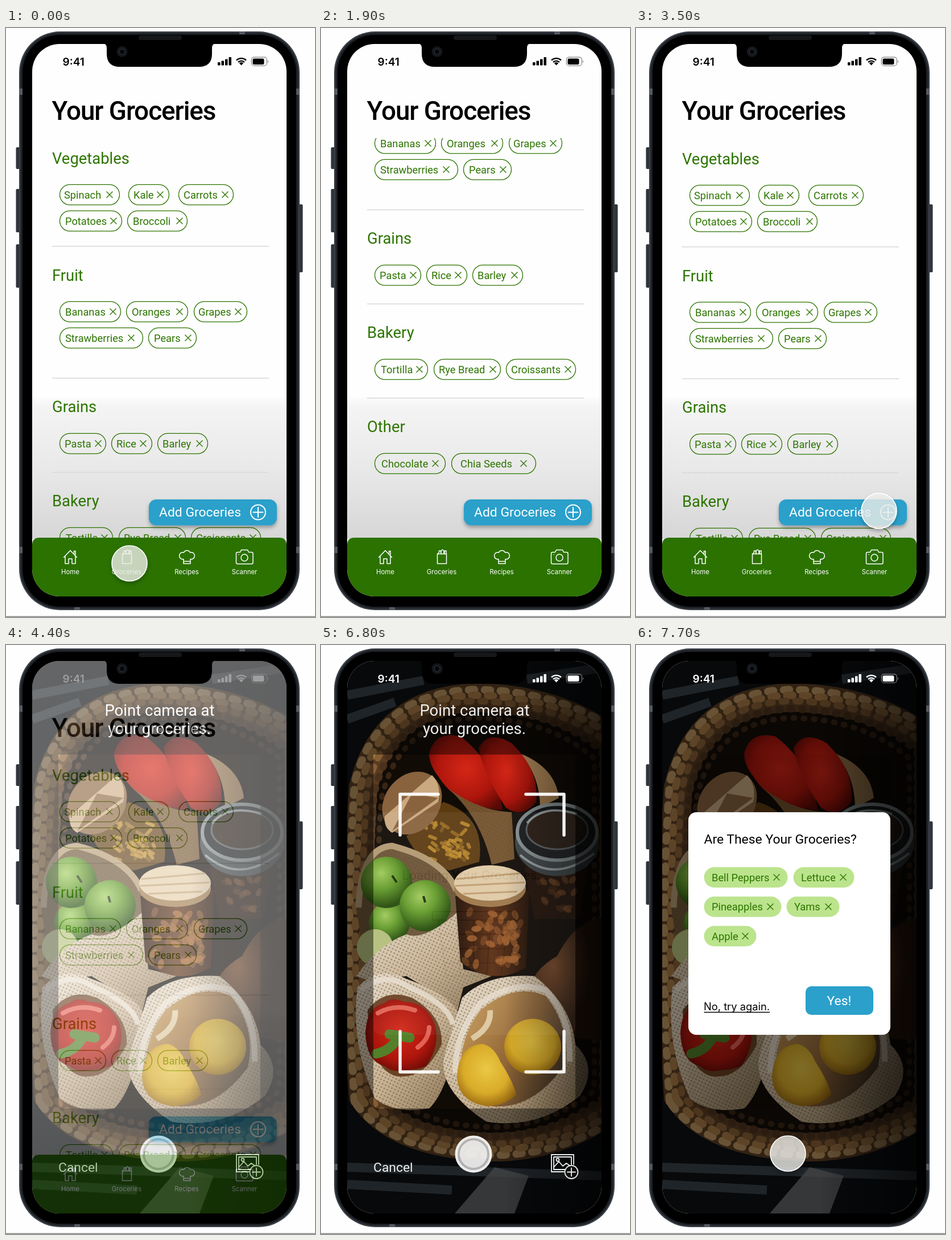
These frames come from a looping animation (543 px wide and 1032 px high, 8 s). An HTML page:

```html
<!DOCTYPE html>
<html lang="en">
<head>
<meta charset="utf-8">
<title>Groceries app</title>
<style>
html, body { margin: 0; width: 100%; height: 100%; overflow: hidden; background: #fefefe; }
svg { display: block; width: 100vw; height: 100vh; }
text { font-family: Roboto, sans-serif; font-size: 18.3px; }
.inter { font-family: Inter, sans-serif; }
.title { font-size: 45.8px; font-weight: 500; letter-spacing: -1.05px; }
.head { font-size: 27.4px; fill: #2d7500; }
.big { font-size: 27.5px; }
.mid { font-size: 22.9px; }
.nav { font-size: 11.4px; }
.time { font-size: 19px; font-weight: 600; }
.line { fill: none; stroke: currentColor; stroke-linecap: round; stroke-linejoin: round; }
.ring { transform-origin: 285px 488px; }

.list, .touch, .camera, .corners, .ui, .shade, .card, .loading, .confirm {
  animation: 8s linear infinite both;
}
.list { animation-name: scroll; }
.touch { animation-name: touch; }
.camera { animation-name: dissolve; }
.corners { animation-name: focus; }
.ui { animation-name: clear; }
.shade, .card { animation-name: show; }
.loading { animation-name: loading; }
.confirm { animation-name: confirm; }

@keyframes scroll {
  0%, 12.5% { transform: translateY(0); animation-timing-function: ease-in-out; }
  18% { transform: translateY(-298px); animation-timing-function: ease-out; }
  23.75% { transform: translateY(-295px); }
  27.5%, 30% { transform: translateY(-294px); animation-timing-function: ease-in-out; }
  33.2%, 33.75% { transform: translateY(4px); animation-timing-function: ease-out; }
  40%, 43.75% { transform: translateY(1px); }
  46.25%, 100% { transform: translateY(0); }
}
@keyframes touch {
  0%, 7.5% { transform: translate(217px, 938px); opacity: 1; }
  9.4% { transform: translate(217px, 938px); opacity: 0; }
  9.41% { transform: translate(250px, 739px); opacity: 0; }
  10%, 12.5% { transform: translate(250px, 739px); opacity: 1; animation-timing-function: ease-in-out; }
  18% { transform: translate(250px, 441px); opacity: .8; }
  20% { transform: translate(250px, 441px); opacity: 0; }
  25.5% { transform: translate(282px, 444px); opacity: 0; }
  27.5%, 30% { transform: translate(282px, 444px); opacity: 1; animation-timing-function: ease-in-out; }
  33.2% { transform: translate(282px, 742px); opacity: .7; }
  33.75% { transform: translate(282px, 742px); opacity: .38; }
  35% { transform: translate(282px, 742px); opacity: 0; }
  35.01%, 41.25% { transform: translate(427px, 846px); opacity: 0; }
  43%, 45.5% { transform: translate(427px, 846px); opacity: 1; }
  47.5%, 96.24% { transform: translate(427px, 846px); opacity: 0; }
  96.25%, 100% { transform: translate(267px, 891px); opacity: 1; }
}
@keyframes dissolve {
  0%, 51% { opacity: 0; animation-timing-function: ease-out; }
  60%, 100% { opacity: 1; }
}
@keyframes focus {
  0%, 74.8% { opacity: 0; }
  78%, 100% { opacity: 1; }
}
@keyframes clear {
  0%, 84.5% { opacity: 1; }
  92%, 100% { opacity: 0; }
}
@keyframes show {
  0%, 84.6% { opacity: 0; }
  92.5%, 100% { opacity: 1; }
}
@keyframes loading {
  0%, 96.24% { opacity: 1; }
  96.25%, 100% { opacity: 0; }
}
@keyframes confirm {
  0%, 96.24% { opacity: 0; }
  96.25%, 100% { opacity: 1; }
}
</style>
</head>
<body>
<svg viewBox="0 0 543 1032" preserveAspectRatio="none">
  <defs>
    <clipPath id="screen"><rect x="46" y="28" width="447" height="968" rx="48"/></clipPath>
    <clipPath id="view"><rect x="46" y="193" width="447" height="701"/></clipPath>
    <linearGradient id="fog" x1="0" y1="0" x2="0" y2="1">
      <stop offset="0" stop-color="#fefefe"/><stop offset=".07" stop-color="#f4f4f4"/>
      <stop offset=".5" stop-color="#e9e9e9"/><stop offset="1" stop-color="#d6d6d6"/>
    </linearGradient>
    <linearGradient id="dusk">
      <stop offset=".62" stop-color="#000" stop-opacity="0"/><stop offset="1" stop-color="#000" stop-opacity=".6"/>
    </linearGradient>
    <linearGradient id="cloth" x1="0" y1="0" x2="1" y2="1">
      <stop stop-color="#efe4d2"/><stop offset=".55" stop-color="#cdb797"/><stop offset="1" stop-color="#8a7453"/>
    </linearGradient>
    <linearGradient id="inside" x1="0" y1="0" x2="1" y2=".6">
      <stop stop-color="#d3a55c"/><stop offset=".6" stop-color="#94683a"/><stop offset="1" stop-color="#54402b"/>
    </linearGradient>
    <linearGradient id="glass">
      <stop stop-color="#241006"/><stop offset=".5" stop-color="#5d3014"/><stop offset="1" stop-color="#241006"/>
    </linearGradient>
    <radialGradient id="apple" cx=".4" cy=".32" r=".65"><stop stop-color="#a3cf5c"/><stop offset=".5" stop-color="#639c2a"/><stop offset="1" stop-color="#274e0c"/></radialGradient>
    <radialGradient id="lemon" cx=".5" cy=".4" r=".65"><stop stop-color="#efcd48"/><stop offset=".6" stop-color="#dfb02a"/><stop offset="1" stop-color="#96650f"/></radialGradient>
    <radialGradient id="red" cx=".5" cy=".45" r=".65"><stop stop-color="#d92818"/><stop offset=".6" stop-color="#b3170d"/><stop offset="1" stop-color="#5c0a06"/></radialGradient>
    <radialGradient id="squash" cx=".35" cy=".4"><stop stop-color="#85502b"/><stop offset="1" stop-color="#301a0d"/></radialGradient>
    <pattern id="mesh" width="6" height="6" patternUnits="userSpaceOnUse" patternTransform="rotate(25)">
      <circle cx="3" cy="3" r="1.6" fill="#5d482e" opacity=".5"/>
    </pattern>
    <filter id="soft" x="-20%" y="-30%" width="140%" height="180%">
      <feDropShadow dx="0" dy="4" stdDeviation="3" flood-color="#000" flood-opacity=".3"/>
    </filter>
    <path id="basket" d="M74 790Q56 520 74 250Q110 98 270 92Q420 94 515 170V810Q420 880 300 880Q130 875 74 790z"/>
    <path id="sack" d="M62 462Q68 352 125 350Q228 380 240 440L238 485L160 520L80 570z"/>
    <path id="drape" d="M62 580Q100 525 150 507Q180 520 240 468L250 568L300 580L250 600L240 640L200 610L150 580L90 590z"/>
    <path id="bagA" d="M64 600Q100 560 150 585Q235 615 246 655Q225 780 190 812Q130 822 95 795Q52 700 64 600z"/>
    <path id="bagB" d="M248 618Q290 575 375 580Q440 630 447 700Q488 740 455 790Q380 850 290 835Q200 775 218 715z"/>
    <g id="status">
      <text class="inter time" x="99.5" y="65.5" fill="currentColor">9:41</text>
      <g fill="currentColor">
        <rect x="372" y="60" width="4.5" height="5.5" rx="1"/><rect x="378.5" y="57.5" width="4.5" height="8" rx="1"/>
        <rect x="385" y="54.5" width="4.5" height="11" rx="1"/><rect x="391.5" y="51" width="4.5" height="14.5" rx="1"/>
        <rect x="433.5" y="53.5" width="20" height="10.5" rx="2.5"/>
        <path d="M460 56.500q2.500 2.300 0 4.600z" opacity=".5"/>
        <path d="M409.800 61.500a6 6 0 0 1 7.400 0l-3.700 4z"/>
      </g>
      <g class="line">
        <rect x="431.300" y="51.200" width="27" height="15" rx="4.500" stroke-width="1.200" opacity=".5"/>
        <path d="M405 56.500a12.500 12.500 0 0 1 17 0M408 59.800a8 8 0 0 1 11 0" stroke-width="2.400" stroke-linecap="butt"/>
      </g>
    </g>
  </defs>

  <!-- phone -->
  <rect y="1030.500" width="543" height="1.500" fill="#8b8b8b"/>
  <g fill="#30353c">
    <rect x="17.500" y="209" width="8" height="38" rx="2"/><rect x="17.500" y="282" width="8" height="76" rx="2"/>
    <rect x="17.500" y="379" width="8" height="76" rx="2"/><rect x="513" y="309" width="8.500" height="119" rx="2"/>
  </g>
  <rect x="23" y="6" width="493" height="1014" rx="72" fill="#3b4047"/>
  <rect x="25.500" y="8.500" width="488" height="1009" rx="69.500" fill="#1d2126"/>
  <path d="M23 106h6v11h-6zM510 106h6v11h-6zM23 909h6v11h-6zM510 909h6v11h-6zM410 6h10v5h-10zM120 1015h10v5h-10z" fill="#565b62"/>
  <rect x="29" y="12" width="481" height="1002" rx="66" fill="#000"/>

  <g clip-path="url(#screen)">
    <g color="#000">
      <rect x="46" y="28" width="447" height="968" fill="#fefefe"/>
      <rect x="46" y="645" width="447" height="250" fill="url(#fog)"/>
      <use href="#status"/>
      <text class="title" x="80.500" y="160.500">Your Groceries</text>
      <g clip-path="url(#view)"><g class="list" id="list"></g></g>
      <g fill="#fff">
        <rect x="251" y="826" width="225" height="45.500" rx="13" fill="#2ba0cb" filter="url(#soft)"/>
        <text class="mid" x="269" y="855.500">Add Groceries</text>
        <path class="line" color="#fff" stroke-width="2" d="M430 848.500a13 13 0 1 0 26 0a13 13 0 1 0-26 0M434.500 848.500h17M443 840v17"/>
      </g>
      <path d="M46 996V906q0-13 13-13H480q13 0 13 13V996z" fill="#2b7200"/>
      <g class="line" color="#fff" stroke-width="1.500">
        <path d="M101.500 927.500L113 915.500l11.500 12M104 925.500V938.500h6v-8.500h6v8.500h6V925.500M119.500 921v-4.500h2.500v6.500"/>
        <path d="M204.500 921.500h16V938.500h-16zM204.500 921.500l3-2.500v-3h3v3M211 921v-5l2.500-2 2.500 2v5M217 921v-5h3v5"/>
        <path d="M312 938.500V930.500a6 6 0 1 1 .5-11.500a6 6 0 0 1 11 0a6 6 0 1 1 .5 11.500V938.500zM312 934.500h12"/>
        <path d="M407 918.500h4.500l2-4h11l2 4h5q2.500 0 2.500 2.500v15.500q0 2.500-2.500 2.500H407q-2.500 0-2.500-2.500V921q0-2.500 2.500-2.500z"/>
        <circle cx="419" cy="928" r="6"/><path d="M409 922.500h.1"/>
      </g>
      <g id="tabs" fill="#fff" text-anchor="middle"></g>
    </g>

    <g class="camera" color="#fff">
      <rect x="46" y="28" width="447" height="968" fill="#0d1013"/>
      <path d="M46 88L180 62M46 130L130 100M362 60L493 40M46 915L493 930M46 945L230 955" stroke="#56636d" stroke-width="16" opacity=".6"/>
      <path d="M235 996L305 915L365 930L340 996z" fill="#7d7f80" opacity=".75"/>
      <!-- woven basket -->
      <use href="#basket" fill="#120c07" stroke="#5b3e22" stroke-width="50"/>
      <g fill="none" stroke-linecap="round">
        <use class="ring" href="#basket" transform="scale(1.07 1.035)" stroke="#bd9461" stroke-width="13" stroke-dasharray="9 17"/>
        <use class="ring" href="#basket" transform="scale(1.02 1.01)" stroke="#a87b47" stroke-width="13" stroke-dasharray="10 17"/>
        <use class="ring" href="#basket" transform="scale(.97 .985)" stroke="#8a6036" stroke-width="12" stroke-dasharray="8 17"/>
        <use class="ring" href="#basket" transform="scale(.91 .95)" stroke="#4c331d" stroke-width="14" stroke-dasharray="3 19"/>
        <use class="ring" href="#basket" transform="scale(.85 .91)" stroke="#3a2615" stroke-width="11" stroke-dasharray="3 18"/>
      </g>
      <!-- long peppers and jars -->
      <path d="M350 190Q412 215 418 268L385 285Q385 230 350 190z" fill="#a68153"/>
      <path d="M190 190Q200 150 245 160Q310 210 319 289Q240 285 206 230Q190 210 190 190z" fill="url(#red)"/>
      <path d="M277 180Q295 148 335 172Q385 220 378 275Q355 305 325 285Q285 225 277 180z" fill="url(#red)"/>
      <path d="M222 250Q275 290 335 293L340 375L300 385Q280 300 222 250z" fill="#77552f"/>
      <path d="M222 250Q275 290 335 293L340 375L300 385Q280 300 222 250z" fill="url(#mesh)"/>
      <path d="M150 335L215 275Q290 300 278 380L225 395Q170 380 150 335z" fill="#5f3d12"/>
      <g id="pasta" stroke="#c8922f" stroke-width="6" stroke-linecap="round"></g>
      <ellipse cx="160" cy="277" rx="48" ry="59" transform="rotate(38 160 277)" fill="#8d6640"/>
      <path d="M112 300L195 228Q212 245 206 275L125 329Q110 320 112 300z" fill="#cfae85"/>
      <path d="M160 260L206 268L125 326Z" fill="#8d6640"/>
      <path d="M358 390L470 385L452 480H375z" fill="#221108"/>
      <g id="nuts" fill="#6b3c1a"></g>
      <ellipse cx="415" cy="345" rx="74" ry="60" fill="#3f4749"/>
      <ellipse cx="415" cy="328" rx="70" ry="49" fill="#191c1d" stroke="#8d9799" stroke-width="6"/>
      <ellipse cx="415" cy="324" rx="54" ry="34" fill="#2a1d13" stroke="#5d6567" stroke-width="3"/>
      <path d="M362 312Q390 278 450 296M350 368Q410 420 480 365" fill="none" stroke="#c3cccd" stroke-width="4" opacity=".7"/>
      <!-- apples and squash -->
      <use href="#sack" fill="#6f5738"/><use href="#sack" fill="url(#mesh)"/>
      <path d="M66 460Q70 354 125 352Q215 375 238 430" fill="none" stroke="#b79c74" stroke-width="11"/>
      <g fill="url(#apple)">
        <circle cx="120" cy="487" r="36"/><circle cx="115" cy="416" r="45"/><circle cx="183" cy="457" r="45"/>
      </g>
      <circle cx="95" cy="530" r="32" fill="#b9c47f"/>
      <path d="M125 404l8 12M180 440l3 11" stroke="#1f330a" stroke-width="4"/>
      <path d="M493 478Q445 485 415 545Q370 570 365 610Q400 700 493 690z" fill="url(#squash)"/>
      <use href="#drape" fill="url(#cloth)"/><use href="#drape" fill="url(#mesh)"/>
      <path d="M236 440L245 555Q300 600 360 565L366 430z" fill="url(#glass)"/>
      <g id="almonds" fill="#a5622c"></g>
      <ellipse cx="297" cy="427" rx="63" ry="32" fill="#a17a4b"/>
      <ellipse cx="297" cy="417" rx="63" ry="31" fill="#e6cfab"/>
      <path d="M238 410L350 400M236 422L358 416M250 436L345 432" stroke="#c4a273" stroke-width="3"/>
      <!-- bags with pepper and lemons -->
      <use href="#bagA" fill="url(#cloth)"/><use href="#bagA" fill="url(#mesh)"/>
      <path d="M82 640Q110 600 160 618Q215 650 212 700Q180 765 130 755Q85 740 82 640z" fill="#6e4425"/>
      <path d="M70 605Q110 570 155 600Q225 630 232 665" fill="none" stroke="#efe5d5" stroke-width="9" opacity=".8"/>
      <use href="#bagB" fill="url(#cloth)"/><use href="#bagB" fill="url(#mesh)"/>
      <path d="M245 770Q240 690 280 640Q340 590 395 615Q440 670 425 740Q370 815 300 808z" fill="url(#inside)"/>
      <path d="M236 750Q235 680 280 628Q340 585 395 605Q440 650 437 730" fill="none" stroke="#efe5d5" stroke-width="10" opacity=".75"/>
      <path d="M265 690Q300 670 297 640" fill="none" stroke="#e3cda4" stroke-width="10"/>
      <path d="M78 680Q80 635 110 628Q125 615 145 625Q185 625 200 665Q210 700 185 738Q165 745 150 745Q125 750 112 738Q80 730 78 680z" fill="url(#red)"/>
      <path d="M100 645Q130 628 165 640M170 705Q190 690 190 670" fill="none" stroke="#f4796a" stroke-width="8" stroke-linecap="round" opacity=".8"/>
      <path d="M97 716Q125 710 135 686M120 682L156 688" fill="none" stroke="#55842a" stroke-width="17" stroke-linecap="round"/>
      <ellipse cx="372" cy="704" rx="50" ry="49" fill="url(#lemon)"/>
      <path d="M315 730Q338 765 343 788Q325 807 291 808Q240 800 239 755Q243 700 285 699Q305 705 315 730z" fill="url(#lemon)"/>
      <rect x="46" y="28" width="447" height="968" fill="url(#dusk)"/>
      <path d="M46 28H493V996H46zM92 192V802q0 10 10 10H447V192z" fill="#000" fill-rule="evenodd" opacity=".45"/>
      <path class="shade" d="M92 192H447V812H102q-10 0-10-10z" fill="#000" fill-opacity=".47"/>
      <use href="#status"/>

      <g class="ui" fill="#fff">
        <g text-anchor="middle">
          <text class="big" x="270" y="123.500">Point camera at</text>
          <text class="big" x="269.500" y="155.500">your groceries.</text>
        </g>
        <text class="mid" x="92" y="923">Cancel</text>
        <circle cx="268" cy="892" r="32.500" fill="#fcfcfc"/>
        <circle cx="268" cy="892" r="26" fill="#f3f3f3" stroke="#bdbdbd" stroke-width="4"/>
        <g class="line" stroke-width="1.800">
          <path d="M427 923H405V893H444V910M429 919H409V897H440V910M410 914l8-9 7 8 6-5 6 4"/>
          <circle cx="416" cy="902" r="2.500"/>
          <circle cx="440" cy="923.500" r="11.500" fill="#111"/><path d="M433 923.500h14M440 916.500v14"/>
        </g>
        <path class="corners line" stroke-width="5.500" stroke-linecap="butt" stroke-linejoin="miter"
          d="M139 333V261.500H206M360 261.500H427V333M139 677V748H206M360 748H427V677"/>
      </g>

      <g class="card">
        <rect x="92" y="293" width="355" height="390" rx="14" fill="#fff"/>
        <g class="loading" color="#111">
          <text class="mid" x="270" y="411" text-anchor="middle">Loading Your Groceries...</text>
          <path class="line" stroke-width="1.500" d="M196 467H340V482H196zM206 482L220 580H316L330 482M209 507H327M213 532H323M217 557H319M238 482L245 580M268 482V580M298 482L291 580"/>
        </g>
        <g class="confirm">
          <text class="mid" x="119.500" y="348">Are These Your Groceries?</text>
          <g id="found"></g>
          <text class="inter" x="119" y="640">No, try again.</text>
          <path d="M119.500 643.500H235" stroke="#000" stroke-width="1.300"/>
          <rect x="298" y="598" width="119" height="50" rx="10" fill="#2ba0cb"/>
          <text class="mid" x="357" y="631" text-anchor="middle" fill="#fff">Yes!</text>
        </g>
      </g>
    </g>
  </g>

  <!-- notch -->
  <path d="M171 27q6 1 6 8V45q0 23 23 23H339q23 0 23-23V35q0-7 6-8z" fill="#000"/>
  <rect x="233" y="13" width="76" height="8" rx="4" fill="#15171a"/>
  <circle cx="204" cy="41.500" r="9.500" fill="#14161a"/>
  <circle cx="204" cy="41.500" r="5" fill="#07080a" stroke="#252a33" stroke-width="1.500"/>

  <g class="touch">
    <circle r="31" fill="#f2f2ee" fill-opacity=".76" stroke="#fff" stroke-width="1.600" filter="url(#soft)"/>
  </g>
</svg>
<script>
const $ = id => document.getElementById(id);
const green = '#2d7500';

// chip: label, left, right, text start, cross centre
function chip([label, left, right, start, cross], y, filled) {
  const look = filled ? 'fill="#bbe48c"' : `fill="none" stroke="${green}" stroke-width="1.3"`;
  return `<rect x="${left + .5}" y="${y - 17.7}" width="${right - left - 1}" height="35.6" rx="17.8" ${look}/>
    <text x="${start - 1}" y="${y + 6.5}" fill="${green}">${label}</text>
    <path d="M${cross - 5.5} ${y - 5.5}l11 11m0-11l-11 11" stroke="${green}" stroke-width="1.4"/>`;
}
const row = (y, chips, filled) => chips.map(c => chip(c, y, filled)).join('');
const head = (label, y) => `<text class="head" x="81" y="${y + 9.5}">${label}</text>`;
const rule = y => `<path d="M81 ${y}.5H462" stroke="#d8d8d8" stroke-width="1.3"/>`;

$('list').innerHTML =
  head('Vegetables', 228) +
  row(292, [['Spinach', 94, 200, 103, 182], ['Kale', 215, 287, 225, 271], ['Carrots', 303, 400, 313, 385]]) +
  row(338, [['Potatoes', 94, 204, 105, 189], ['Broccoli', 213, 319, 224, 305]]) + rule(382) +
  head('Fruit', 433) +
  row(497, [['Bananas', 94, 202, 105, 188], ['Oranges', 211, 320, 222, 305], ['Grapes', 330, 424, 339, 408]]) +
  row(543, [['Strawberries', 94, 241, 105, 220], ['Pears', 250, 335, 261, 320]]) + rule(613) +
  head('Grains', 663) +
  row(728, [['Pasta', 94, 176, 104, 162], ['Rice', 185, 257, 195, 241], ['Barley', 266, 355, 276, 340]]) + rule(778) +
  head('Bakery', 828) +
  row(893, [['Tortilla', 94, 188, 106, 173], ['Rye Bread', 198, 316, 208, 302], ['Croissants', 325, 448, 335, 434]]) + rule(943) +
  head('Other', 993) +
  row(1058, [['Chocolate', 94, 219, 107, 201], ['Chia Seeds', 229, 378, 246, 356]]);

$('found').innerHTML =
  row(407, [['Bell Peppers', 119, 267, 134, 247], ['Lettuce', 276, 384, 291, 364]], true) +
  row(458.5, [['Pineapples', 119, 256, 134, 236], ['Yams', 264, 358, 279, 338]], true) +
  row(510, [['Apple', 119, 212, 134, 192]], true);

$('tabs').innerHTML = [['Home', 113], ['Groceries', 212], ['Recipes', 317.5], ['Scanner', 419]]
  .map(([label, x]) => `<text class="inter nav" x="${x}" y="956.5">${label}</text>`).join('');

let seed = 7;
const rand = (a, b) => a + (b - a) * ((seed = seed * 16807 % 2147483647) / 2147483647);
const many = (n, make) => Array.from({ length: n }, make).join('');
const nut = (x, y, r) =>
  `<ellipse cx="${x}" cy="${y}" rx="${r}" ry="${r * .6}" transform="rotate(${rand(0, 180)} ${x} ${y})" opacity="${rand(.25, .9)}"/>`;

$('almonds').innerHTML = many(46, () => nut(rand(254, 350), rand(468, 562), 9));
$('nuts').innerHTML = many(18, () => nut(rand(380, 445), rand(410, 465), 8));
$('pasta').innerHTML = many(34, () =>
  `<path d="M${rand(185, 262)} ${rand(312, 380)}l${rand(-13, 13)} ${rand(-9, 9)}" opacity="${rand(.3, .9)}"/>`);
</script>
</body>
</html>
```
